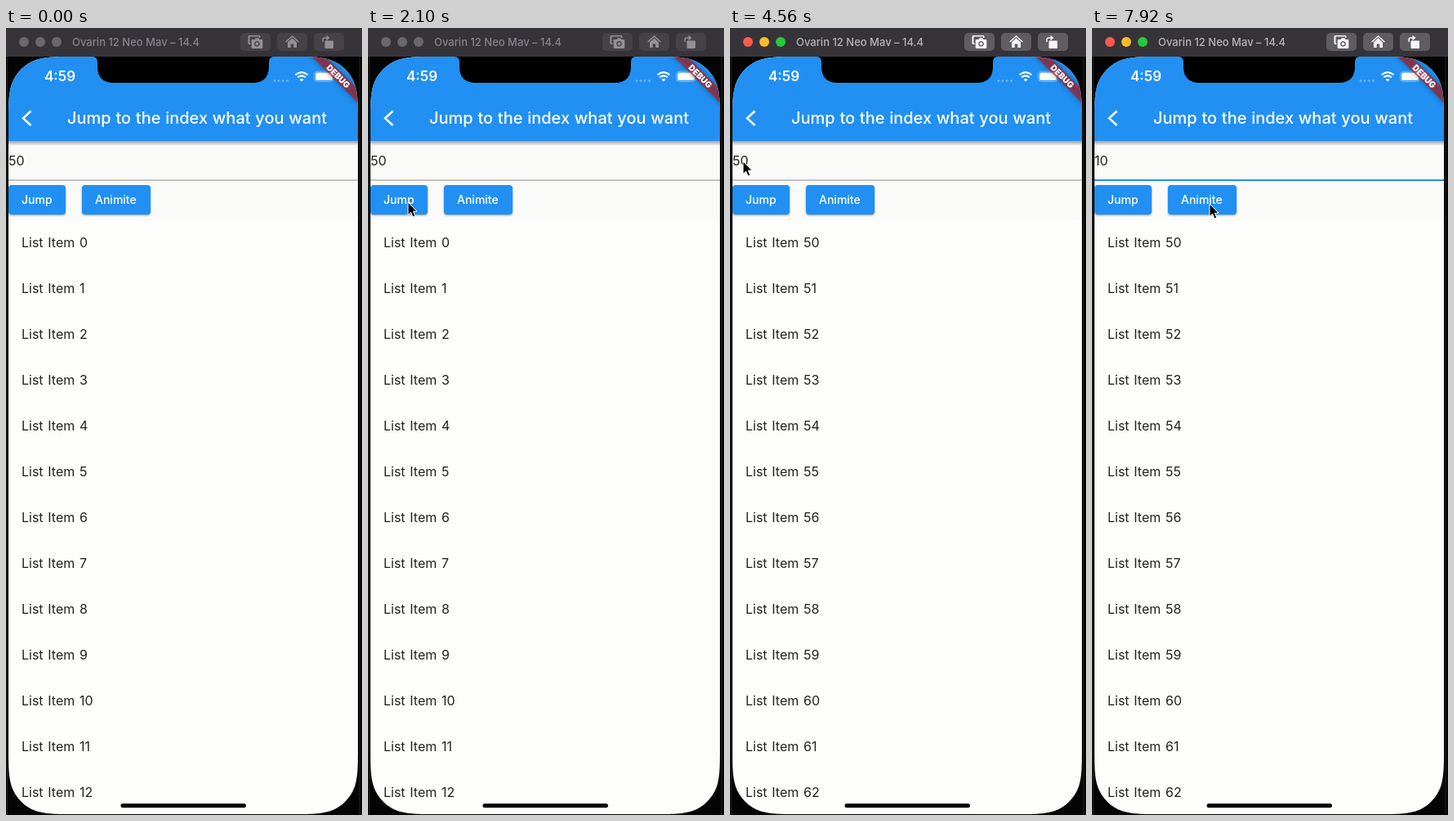
These frames come from a looping animation (436 px wide and 962 px high, 8000 ms). An HTML page:

```html
<!DOCTYPE html>
<html lang="en">
<head>
<meta charset="utf-8">
<title>Jump to index</title>
<style>
  :root { --blue: #2190f2; --ink: #222; --loop: 8s step-end infinite; }
  html, body { margin: 0; width: 100%; height: 100%; overflow: hidden; background: #040404; }
  svg { display: block; width: 436px; height: 962px; font-family: Inter, sans-serif; }
  text { fill: #fff; }
  .body text { fill: var(--ink); font-size: 16px; word-spacing: 1.2px; }
  .title { font-size: 20px; font-weight: 500; word-spacing: .4px; }
  .label { font-size: 14px; font-weight: 500; }
  .button { fill: var(--blue); filter: drop-shadow(0 1.5px 1.2px #0006); }

  /* Window chrome: dim until the window is activated */
  .wake { animation: wake var(--loop); }
  @keyframes wake { 0% { fill: var(--dim); } 34%, 100% { fill: var(--lit); } }
  .icon { --dim: #929094; --lit: #f6f5f7; }
  .key { --dim: #454348; --lit: #5f5d62; }

  /* List jump and field edits */
  .until-jump { animation: hide var(--loop); }
  .after-jump { animation: show var(--loop); }
  @keyframes hide { 0% { visibility: visible; } 40%, 100% { visibility: hidden; } }
  @keyframes show { 0% { visibility: hidden; } 40%, 100% { visibility: visible; } }
  .first { animation: first var(--loop); }
  .second { animation: second var(--loop); }
  .third { animation: third var(--loop); }
  @keyframes first { 0% { visibility: visible; } 71%, 100% { visibility: hidden; } }
  @keyframes second { 0% { visibility: hidden; } 71% { visibility: visible; } 83.5%, 100% { visibility: hidden; } }
  @keyframes third { 0% { visibility: hidden; } 83.5%, 100% { visibility: visible; } }
  .focus { animation: focus var(--loop); }
  @keyframes focus { 0% { visibility: hidden; } 59%, 100% { visibility: visible; } }

  .caret { animation: caret var(--loop); }
  @keyframes caret {
    0% { transform: translateX(12px); visibility: hidden; }
    59% { transform: translateX(12px); visibility: visible; }
    71% { transform: translateX(3px); visibility: visible; }
    83.5%, 100% { transform: translateX(10px); visibility: visible; }
  }
  .caret rect { animation: blink 1s linear infinite; }
  @keyframes blink { 0%, 27% { opacity: 1; } 42%, 92% { opacity: 0; } 100% { opacity: 1; } }

  .pointer { animation: point 8s ease-in-out infinite; }
  @keyframes point {
    0%, 11% { transform: translate(440px, 600px); animation-timing-function: ease-in; }
    16% { transform: translate(148px, 322px); animation-timing-function: ease-out; }
    22%, 48% { transform: translate(49px, 213px); }
    55%, 62% { transform: translate(16px, 163px); }
    68%, 86% { transform: translate(47px, 175px); }
    94%, 100% { transform: translate(144px, 215px); }
  }
</style>
</head>
<body>
<svg viewBox="0 0 436 962">
  <defs>
    <clipPath id="screen"><path id="outline"/></clipPath>
    <linearGradient id="shade" x2="0" y2="1">
      <stop stop-color="#444" stop-opacity=".5"/>
      <stop offset="1" stop-color="#444" stop-opacity="0"/>
    </linearGradient>
  </defs>

  <rect width="436" height="962" fill="#040404"/>
  <path d="M1.5 35V962M433 35V962" stroke="#222124"/>

  <g id="chrome">
    <rect width="436" height="35" fill="#363439"/>
    <circle class="wake" cx="22" cy="17" r="6" style="--dim:#6a686d;--lit:#fe5a48"/>
    <circle class="wake" cx="42" cy="17" r="6" style="--dim:#6a686d;--lit:#febb2c"/>
    <circle class="wake" cx="62" cy="17" r="6" style="--dim:#6a686d;--lit:#28c83c"/>
    <text class="wake" x="81" y="21.7" font-size="13" font-weight="500" style="--dim:#86848a;--lit:#b7b5b9">Ovarin 12 Neo Mav – 14.4</text>
    <g class="wake key">
      <rect x="287" y="6" width="37" height="22" rx="5"/>
      <rect x="332" y="6" width="37" height="22" rx="5"/>
      <rect x="377" y="6" width="37" height="22" rx="5"/>
    </g>
    <g class="wake icon">
      <path d="M298 9h12a1.5 1.5 0 0 1 1.5 1.5V12h-1.5v-1.5h-11.5v8h1V20H298a1.5 1.5 0 0 1-1.5-1.5v-8A1.5 1.5 0 0 1 298 9Z"/>
      <path fill-rule="evenodd" d="M302 14h2.5l1.3-1.7h3.4l1.3 1.7H313a1.3 1.3 0 0 1 1.3 1.3v8.4A1.3 1.3 0 0 1 313 25h-11a1.3 1.3 0 0 1-1.3-1.3v-8.4A1.3 1.3 0 0 1 302 14Zm5.5 2a3.4 3.4 0 1 0 .01 0Zm0 1.5a1.9 1.9 0 1 1-.01 0Z"/>
      <path d="M350.5 9l8.3 7.4-1 1.1-7.3-6.5-7.3 6.5-1-1.1ZM345 17.3l5.5-4.8 5.5 4.8V24h-3.7v-4.6h-3.6V24H345Z"/>
      <path d="M391.5 15.5H400a1 1 0 0 1 1 1V24a1 1 0 0 1-1 1h-8.5a1 1 0 0 1-1-1v-7.5a1 1 0 0 1 1-1Z"/>
      <path d="M387.3 17v-2.5q0-3.2 3.2-3.2h2V8.7l4 3.4-4 3.3v-2.6h-2q-1.7 0-1.7 1.7V17Z"/>
    </g>
  </g>

  <g clip-path="url(#screen)">
    <rect x="3" y="35" width="428" height="927" fill="#fdfdfc"/>
    <rect x="3" y="138" width="428" height="97" fill="#fafaf8"/>
    <rect x="3" y="138" width="428" height="6" fill="url(#shade)"/>
    <rect x="3" y="35" width="428" height="103" fill="var(--blue)"/>

    <text x="47" y="65.3" font-size="17" font-weight="600">4:59</text>
    <g fill="#fff">
      <g opacity=".4">
        <circle cx="329" cy="64.5" r="1.3"/><circle cx="334" cy="64.5" r="1.3"/>
        <circle cx="339.2" cy="64.5" r="1.3"/><circle cx="344.5" cy="64.5" r="1.3"/>
      </g>
      <path d="M362 65.5l-2.5-2.6q2.5-2 5 0Z"/>
      <rect x="379" y="54.5" width="21" height="9.5" rx="2.5"/>
    </g>
    <rect x="377.5" y="53" width="24" height="12.5" rx="4" fill="none" stroke="#fff" stroke-opacity=".4"/>
    <path d="M354.5 57.3q7.5-6.5 15 0M357.2 60.3q4.8-4 9.6 0" fill="none" stroke="#fff" stroke-width="2.1"/>
    <path d="M30.5 101.5L21 110.3l9.5 8.7" fill="none" stroke="#fff" stroke-width="2.5"/>
    <text class="title" x="75" y="117.3">Jump to the index what you want</text>

    <g class="body">
      <text class="first" x="3" y="168">50</text>
      <text class="second" x="3" y="168">0</text>
      <text class="third" x="3" y="168">10</text>
      <g id="list"></g>
    </g>
    <rect x="3" y="185.5" width="428" height="1" fill="#8c8c8c"/>
    <rect class="focus" x="3" y="185" width="428" height="2" fill="var(--blue)"/>
    <g class="caret"><rect y="152" width="2" height="20" rx="1" fill="var(--blue)"/></g>

    <rect class="button" x="3" y="192" width="70" height="36" rx="4"/>
    <rect class="button" x="93" y="192" width="84" height="36" rx="4"/>
    <text class="label" x="19" y="215">Jump</text>
    <text class="label" x="109" y="215">Animite</text>

    <g transform="translate(431 35) rotate(45)">
      <rect x="-60" y="28" width="120" height="12" fill="#b71c1ca0" style="filter:drop-shadow(0 0 3px #0008)"/>
      <text y="37.7" font-size="10.2" font-weight="900" text-anchor="middle">DEBUG</text>
    </g>
    <path d="M106 35q6 0 6 7v5q0 20 20 20h170q20 0 20-20v-5q0-7 6-7Z"/>
    <rect x="140.5" y="948" width="153.5" height="5" rx="2.5"/>
  </g>

  <g class="pointer">
    <path d="M0 0V15.5L3.5 12.2 6 18 8.8 16.8 6.3 11.2H11Z" stroke="#fff" stroke-width="1" stroke-linejoin="round"/>
  </g>
</svg>
<script>
  const byId = id => document.getElementById(id);

  const rows = (start, name) => {
    const items = Array.from({ length: 13 }, (_, i) =>
      `<text x="19" y="${268 + 56 * i}">List Item ${start + i}</text>`);
    return `<g class="${name}">${items.join('')}</g>`;
  };
  byId('list').innerHTML = rows(0, 'until-jump') + rows(50, 'after-jump');

  // Continuous corners: each one eases into its arc from both sides.
  const smoothRect = (x, y, w, h, r) => {
    const half = [[1.53, 0], [1.09, 0], [.87, 0], [.63, .075], [.37, .17]];
    const corner = [...half, ...half.map(([a, b]) => [b, a]).reverse()];
    const place = (right, bottom) => {
      const pts = corner.map(([a, b]) =>
        [right ? x + w - a * r : x + a * r, bottom ? y + h - b * r : y + b * r].join(' '));
      if (right === bottom) pts.reverse();
      return `${pts[0]}C${pts.slice(1).join(' ')}`;
    };
    return `M${place(0, 0)}L${place(1, 0)}L${place(1, 1)}L${place(0, 1)}Z`;
  };
  byId('outline').setAttribute('d', smoothRect(3, 35, 428, 926, 53.3));
</script>
</body>
</html>
```
